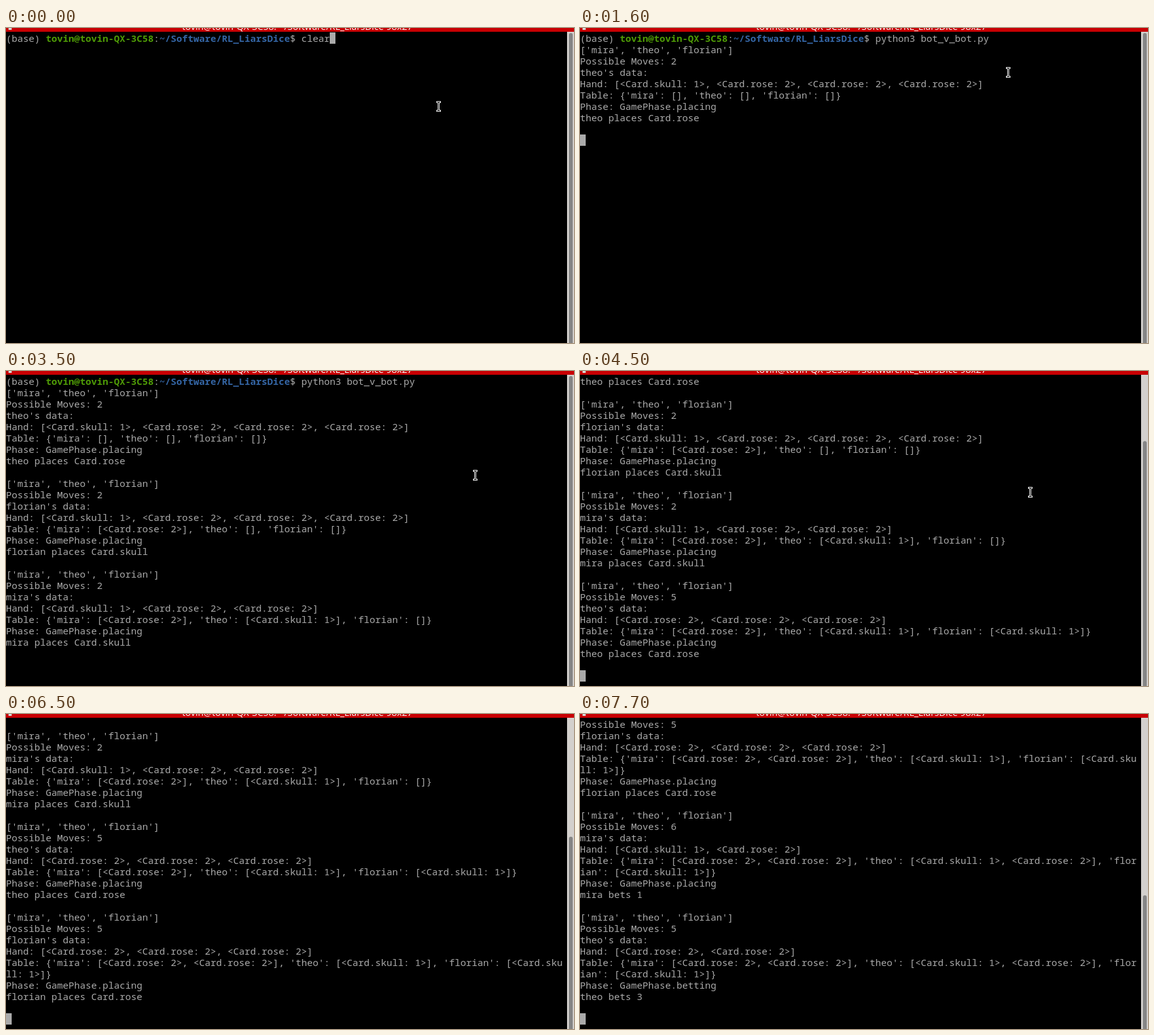
An HTML page with a canvas for the animation above (8000 ms loop, 900x500 px).

```html
<!DOCTYPE html>
<html lang="en">
<head>
<meta charset="utf-8">
<title>Terminal</title>
<style>
  html, body { margin: 0; width: 100%; height: 100%; overflow: hidden; background: #000; }
  canvas { display: block; width: 900px; height: 500px; }
</style>
</head>
<body>
<canvas id="stage" width="900" height="500"></canvas>
<script>
const ctx = document.getElementById('stage').getContext('2d');

const LOOP = 8000, STEP = 100;
const COLS = 98, ROWS = 27;
const CELL_W = 9, CELL_H = 18, TOP = 7, BASELINE = 15;
const MONO = '15px "Noto Sans Mono", "DejaVu Sans Mono", monospace';
const GREY = '#aaaaaa', GREEN = '#4e9a06', BLUE = '#3465a4';

const PLAYERS = ['mira', 'theo', 'florian'];
const HOST = 'tovin@tovin-QX-3C58';
const PATH = '~/Software/RL_LiarsDice';
const PROMPT_LEN = `(base) ${HOST}:${PATH}$ `.length;

// The block cursor stays solid until BLINK_START, then toggles
const BLINK_START = 990, BLINK = 608;

// s = skull, r = rose; piles are in player order; bar: the scrollbar reacts before the text
const TURNS = [
  { at: 1600, moves: 2, hand: 'srrr', piles: ',,', act: 'places Card.rose' },
  { at: 2600, moves: 2, hand: 'srrr', piles: 'r,,', act: 'places Card.skull' },
  { at: 3500, moves: 2, hand: 'srr', piles: 'r,s,', act: 'places Card.skull' },
  { at: 4500, moves: 5, hand: 'rrr', piles: 'r,s,s', act: 'places Card.rose' },
  { at: 5600, bar: 5500, moves: 5, hand: 'rrr', piles: 'rr,s,s', act: 'places Card.rose' },
  { at: 6600, moves: 6, hand: 'sr', piles: 'rr,sr,s', act: 'bets 1' },
  { at: 7500, moves: 5, hand: 'rr', piles: 'rr,sr,s', act: 'bets 3', phase: 'betting' }
];

// The pointer rests at each point and glides to the next, arriving at time t
const GLIDE = 200, POINTER_GONE = 5500;
const POINTER = [
  { t: 0, x: 685, y: 124 },
  { t: 800, x: 712, y: 78 },
  { t: 1000, x: 678, y: 70 },
  { t: 2000, x: 684, y: 20 },
  { t: 2700, x: 732, y: 55 },
  { t: 2900, x: 777, y: 125 },
  { t: 3200, x: 743, y: 165 },
  { t: 3700, x: 739, y: 190 },
  { t: 4300, x: 713, y: 192 },
  { t: 4700, x: 742, y: 198 },
  { t: 4900, x: 753, y: 198 }
];

const quote = s => `'${s}'`;
const cards = s => '[' + [...s].map(c => c === 's' ? '<Card.skull: 1>' : '<Card.rose: 2>').join(', ') + ']';
const wrap = line => line.match(new RegExp(`.{1,${COLS}}`, 'g')) || [''];

function turnLines({ moves, hand, piles, act, phase = 'placing' }, i) {
  const name = PLAYERS[(i + 1) % PLAYERS.length];
  const table = piles.split(',').map((pile, p) => `${quote(PLAYERS[p])}: ${cards(pile)}`);
  return [
    `[${PLAYERS.map(quote).join(', ')}]`,
    `Possible Moves: ${moves}`,
    `${name}'s data:`,
    `Hand: ${cards(hand)}`,
    `Table: {${table.join(', ')}}`,
    `Phase: GamePhase.${phase}`,
    `${name} ${act}`,
    ''
  ].flatMap(wrap);
}

TURNS.forEach((turn, i) => { turn.lines = turnLines(turn, i); });

function rect(x, y, w, h, color) {
  ctx.fillStyle = color;
  ctx.fillRect(x, y, w, h);
}

function write(text, col, row, color = GREY, bold = false) {
  ctx.font = (bold ? 'bold ' : '') + MONO;
  ctx.fillStyle = color;
  ctx.fillText(text, col * CELL_W, TOP + row * CELL_H + BASELINE);
  return col + text.length;
}

function drawPrompt(command) {
  let col = write('(base) ', 0, 0);
  col = write(HOST, col, 0, GREEN, true);
  col = write(':', col, 0);
  col = write(PATH, col, 0, BLUE, true);
  col = write('$ ', col, 0);
  write(command, col, 0);
}

function drawTerminal(t) {
  const lines = TURNS.filter(turn => t >= turn.at).flatMap(turn => turn.lines);
  const command = t < 100 ? 'clear' : 'python3 bot_v_bot.py ';
  const entered = t >= 500;
  const row = entered ? lines.length + 1 : 0;
  const col = entered ? 0 : PROMPT_LEN + command.length;
  const offset = Math.max(0, row - ROWS + 1);

  if (!offset) drawPrompt(command);
  lines.forEach((line, i) => {
    if (i + 1 >= offset) write(line, 0, i + 1 - offset);
  });

  const hidden = t >= BLINK_START && Math.floor((t - BLINK_START) / BLINK) % 2 === 0;
  if (!hidden) rect(col * CELL_W, TOP + (row - offset) * CELL_H, CELL_W, CELL_H, GREY);
}

function drawScrollbar(t) {
  const shown = TURNS.filter(turn => t >= (turn.bar || turn.at));
  const total = Math.max(ROWS, shown.flatMap(turn => turn.lines).length + 2);
  const top = 8 + 502 * (total - ROWS) / total;
  rect(889, 6, 11, 494, '#d3d0cd');
  ctx.fillStyle = '#858585';
  ctx.beginPath();
  ctx.roundRect(892, top, 6, 510 - top, 3);
  ctx.fill();
}

function drawTitle() {
  rect(0, 0, 900, 6, '#c80003');
  ctx.save();
  ctx.beginPath();
  ctx.rect(0, 0, 900, 6);
  ctx.clip();
  ctx.font = '14.8px "Open Sans", "Noto Sans", sans-serif';
  ctx.textAlign = 'center';
  ctx.fillStyle = '#fff';
  ctx.fillText(`${HOST}: ${PATH} ${COLS}x${ROWS}`, 461.5, 3);
  ctx.restore();
  rect(4, 0, 5, 3, '#d8d8d8');
}

function pointerAt(t) {
  let { x, y } = POINTER[0];
  for (const stop of POINTER.slice(1)) {
    const k = Math.min(1, Math.max(0, 1 - (stop.t - t) / GLIDE));
    x += (stop.x - x) * k;
    y += (stop.y - y) * k;
  }
  return [Math.round(x), Math.round(y)];
}

function drawPointer(t) {
  if (t >= POINTER_GONE) return;
  const [x, y] = pointerAt(t);
  rect(x - 3, y - 8, 7, 3, '#fff');
  rect(x - 3, y + 6, 7, 3, '#fff');
  rect(x - 1, y - 6, 3, 13, '#fff');
  rect(x - 2, y - 7, 5, 1, '#000');
  rect(x - 2, y + 7, 5, 1, '#000');
  rect(x, y - 7, 1, 15, '#000');
}

function draw(t) {
  rect(0, 0, 900, 500, '#000');
  drawTerminal(t);
  drawTitle();
  drawScrollbar(t);
  drawPointer(t);
}

const start = performance.now();
function tick() {
  const t = (performance.now() - start) % LOOP;
  draw(Math.floor(t / STEP) * STEP);
  requestAnimationFrame(tick);
}
tick();
</script>
</body>
</html>
```
